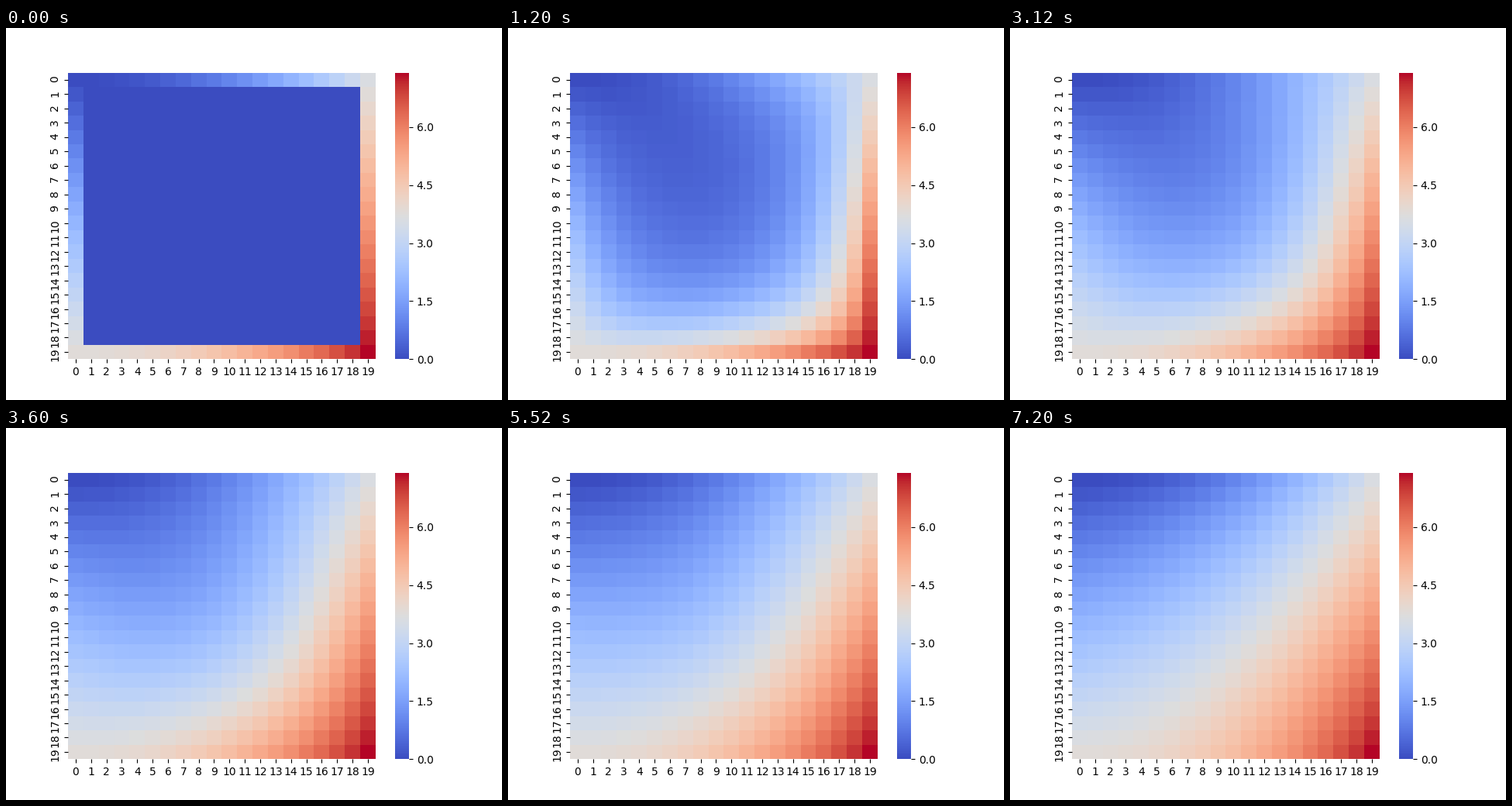
Recreate the animation shown at these times as a matplotlib script. Size 640 by 480 pixels, loop 8 s.

```python
import numpy as np
import matplotlib.pyplot as plt
from matplotlib.animation import FuncAnimation

N = 20          # grid points per side
H = 0.1         # grid spacing
DT = 0.1        # time step
LAM = DT / H**2
INTERVAL = 400  # ms per drawn frame
HOLD = 3        # drawn frames per time step
FRAMES = 20


def initial_field():
    """Zero plate with fixed edges x^2 + 2y."""
    s = np.arange(N) * H
    u = s[None, :]**2 + 2 * s[:, None]
    u[1:-1, 1:-1] = 0
    return u


def sweep_rows(u):
    """One implicit heat step along the rows."""
    m = N - 2
    matrix = (1 + 2 * LAM) * np.eye(m) - LAM * (np.eye(m, k=1) + np.eye(m, k=-1))
    rhs = u[1:-1, 1:-1].copy()
    rhs[:, 0] += LAM * u[1:-1, 0]
    rhs[:, -1] += LAM * u[1:-1, -1]
    out = u.copy()
    out[1:-1, 1:-1] = np.linalg.solve(matrix, rhs.T).T
    return out


def heat_step(u):
    """Split step: horizontal sweep, then vertical sweep."""
    return sweep_rows(sweep_rows(u).T).T


fields = [initial_field()]
for _ in range((FRAMES - 1) // HOLD):
    fields.append(heat_step(fields[-1]))

fig, ax = plt.subplots(figsize=(6.4, 4.8), dpi=100)
mesh = ax.pcolormesh(fields[0], cmap="coolwarm", vmin=0, vmax=fields[0].max())
ax.set(xlim=(0, N), ylim=(N, 0))
ax.spines[:].set_visible(False)
centers = np.arange(N) + 0.5
ax.set_xticks(centers, labels=range(N))
ax.set_yticks(centers)
ax.set_yticklabels(range(N), rotation="vertical")

bar = fig.colorbar(mesh, ax=ax, ticks=np.arange(0, 7, 1.5))
bar.outline.set_linewidth(0)


def update(i):
    mesh.set_array(fields[i // HOLD])
    return (mesh,)


anim = FuncAnimation(fig, update, frames=FRAMES, interval=INTERVAL,
                     repeat=True, repeat_delay=0)
plt.show()
```
